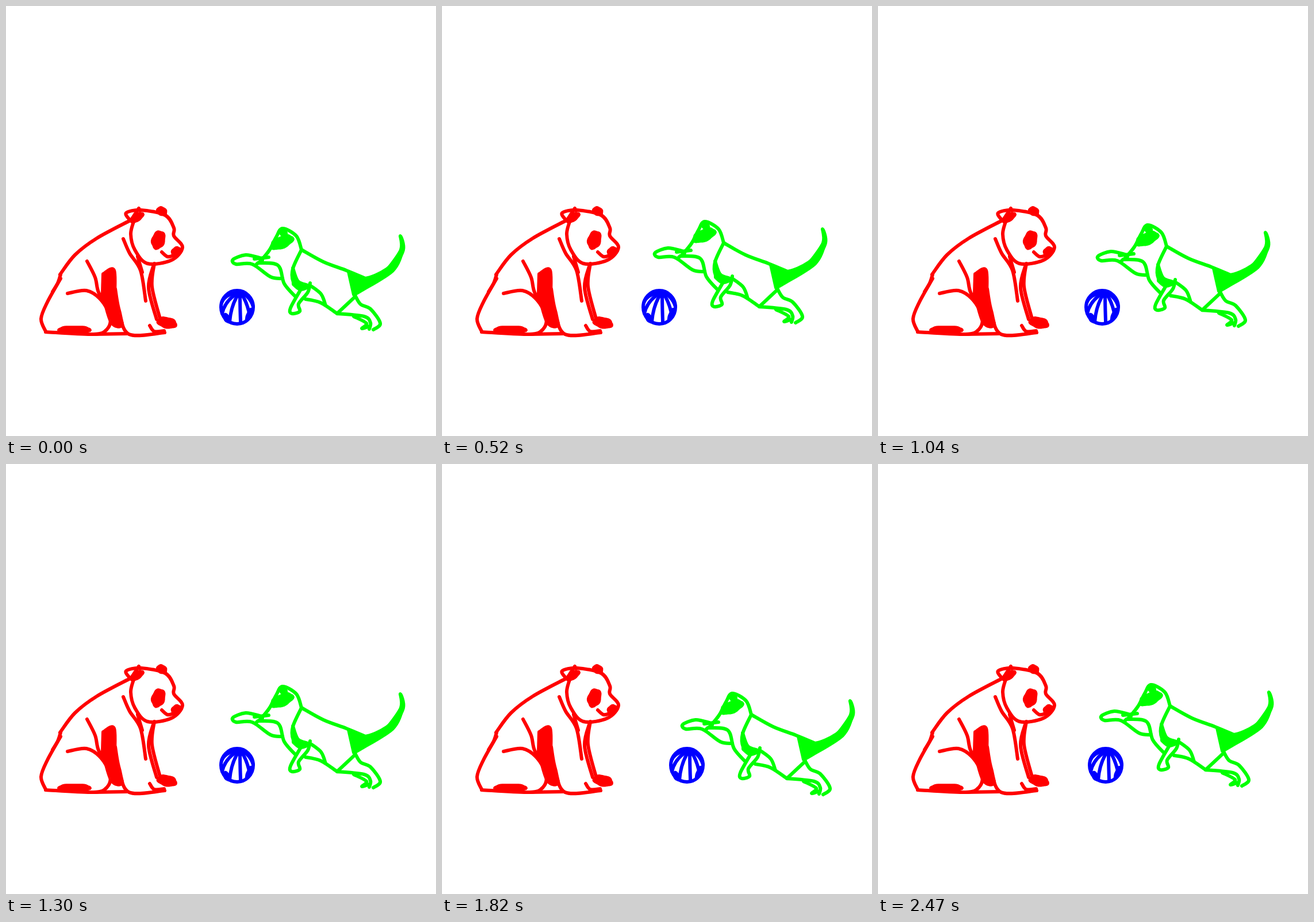
Recreate the animation shown at these times as an HTML page. Size 748x748 px, loop 2600 ms.

```html
<!DOCTYPE html>
<html>
<head>
<meta charset="utf-8">
<style>
html, body { margin: 0; width: 100%; height: 100%; overflow: hidden; background: #fff }
svg { display: block; width: 100vw; height: 100vh }
g { fill: none; stroke-width: 6; stroke-linecap: round; stroke-linejoin: round }
#panda { stroke: #f00; --ink: #f00 }
#ball { stroke: #00f; --ink: #00f }
#cat { stroke: #0f0; --ink: #0f0 }
.solid { fill: var(--ink) }
</style>
</head>
<body>
<svg viewBox="0 0 748 748">
  <g id="panda"></g>
  <g id="ball"></g>
  <g id="cat"></g>
</svg>
<script>
const get = id => document.getElementById(id);

// Smooth path through the points of "x,y x,y ..."
function spline(text) {
  const p = text.split(' ').map(s => s.split(',').map(Number));
  let d = 'M' + p[0];
  for (let i = 0; i < p.length - 1; i++) {
    const a = p[i - 1] || p[i], b = p[i], c = p[i + 1], e = p[i + 2] || c;
    const c1 = b.map((v, k) => v + (c[k] - a[k]) / 6);
    const c2 = c.map((v, k) => v - (e[k] - b[k]) / 6);
    d += `C${c1} ${c2} ${c}`;
  }
  return d;
}

// Pen with line, patch and scribbled blob for one figure
function pen(id) {
  const add = (d, solid) => {
    const path = document.createElementNS('http://www.w3.org/2000/svg', 'path');
    path.setAttribute('d', d);
    if (solid) path.setAttribute('class', 'solid');
    get(id).append(path);
  };
  return {
    path: add,
    line: text => add(spline(text)),
    patch: text => add(spline(text) + 'Z', true),
    blob(x, y, rx, ry, tilt = 0) {
      const c = Math.cos(tilt), s = Math.sin(tilt), points = [];
      for (let i = 0; i <= 24; i++) {
        const a = i * Math.PI / 12, r = 1 + .07 * Math.sin(5 * a);
        const u = rx * r * Math.cos(a), v = ry * r * Math.sin(a);
        points.push([x + u * c - v * s, y + u * s + v * c]);
      }
      add(spline(points.join(' ')), true);
    }
  };
}

function drawPanda() {
  const { line, patch, blob } = pen('panda');
  // back, seat and haunch
  line('216,373 158,404 120,433 94,467');
  line('95,474 72,515 61,544 69,566');
  line('95,467 90,482 81,497');
  line('69,567 152,571 176,562 181,540 165,511 140,495 107,500');
  line('152,571 210,570');
  // arm and chest
  line('141,444 155,472 161,498 178,528');
  line('190,492 197,530 214,571 276,568');
  line('204,405 215,430 234,460 243,513');
  line('258,448 254,488 268,544');
  line('257,450 248,490 262,545');
  line('250,556 258,566 275,565');
  patch('169,466 188,460 190,515 202,554 183,550 168,500');
  // head
  line('216,373 209,360 235,355 277,364 292,386 292,400 307,420 288,442 246,448 224,424 217,397 222,375');
  line('231,352 218,372');
  line('229,436 237,463');
  line('271,428 281,436 292,434');
  blob(228, 368, 11, 4, -.6);
  blob(271, 357, 7, 5, .5);
  blob(265, 407, 9, 14, .3);
  blob(296, 427, 7, 5, -.7);
  // paws
  blob(119, 563, 26, 4);
  blob(280, 551, 15, 7, .2);
}

function drawCat() {
  const { line, patch, blob } = pen('cat');
  // reaching paw and head
  line('441,438 417,433 395,441 400,449 428,449 460,471 481,474');
  line('441,446 458,425 470,402 481,387 505,400 514,424');
  line('432,440 457,437');
  line('436,449 446,442');
  line('438,447 473,451 484,483 503,505');
  blob(480, 411, 19, 8, -.4);
  blob(483, 395, 4, 4);
  // body
  line('514,424 499,457 500,480 514,491');
  line('514,424 552,445 592,460 623,473');
  line('521,510 547,516 576,535');
  line('608,505 577,534');
  patch('499,456 508,479 526,487 512,493 500,484');
  // legs
  line('514,491 495,525 497,535 511,531 509,518 525,498 529,482');
  line('529,486 548,501 556,521');
  line('576,535 623,540 634,551 632,562');
  line('605,540 627,552 619,561 632,557');
  line('608,505 617,519 634,527 651,552 639,563');
  // tail
  line('664,458 687,424 686,400 691,424 673,460');
  patch('596,462 623,474 662,458 687,430 672,461 618,495 605,502');
}

function drawBall() {
  const { path, blob } = pen('ball');
  const cx = 402, cy = 524, r = 28, pole = '407,497';
  path(`M${cx - r},${cy}a${r},${r + 1} 0 1 1 ${2 * r},0a${r},${r + 1} 0 1 1 ${-2 * r},0`);
  // seams fan out from the pole
  for (let i = 0; i < 6; i++) {
    const a = 3.45 - i * .7;
    const x = cx + r * Math.cos(a), y = cy + r * Math.sin(a);
    path(`M${pole}Q${cx + .8 * (x - cx)},${(497 + y) / 2 - 5} ${x},${y}`);
  }
  blob(384, 543, 3, 7, -.6);
  blob(423, 537, 2, 10, .4);
}

drawPanda();
drawBall();
drawCat();

const STEP = 130, COUNT = 20;

// Sideways shift: down to -30, up to 24, then down again
function shift(n) {
  if (n <= 5) return -6 * n;
  return n <= 14 ? 6 * (n - 10) : 6 * (18 - n);
}

const start = performance.now();
function tick() {
  const n = Math.floor((performance.now() - start) / STEP) % COUNT;
  const x = shift(n);
  get('cat').setAttribute('transform', `translate(${x} ${x / 2})`);
  get('ball').setAttribute('transform', `translate(${x})`);
  requestAnimationFrame(tick);
}
tick();
</script>
</body>
</html>
```
